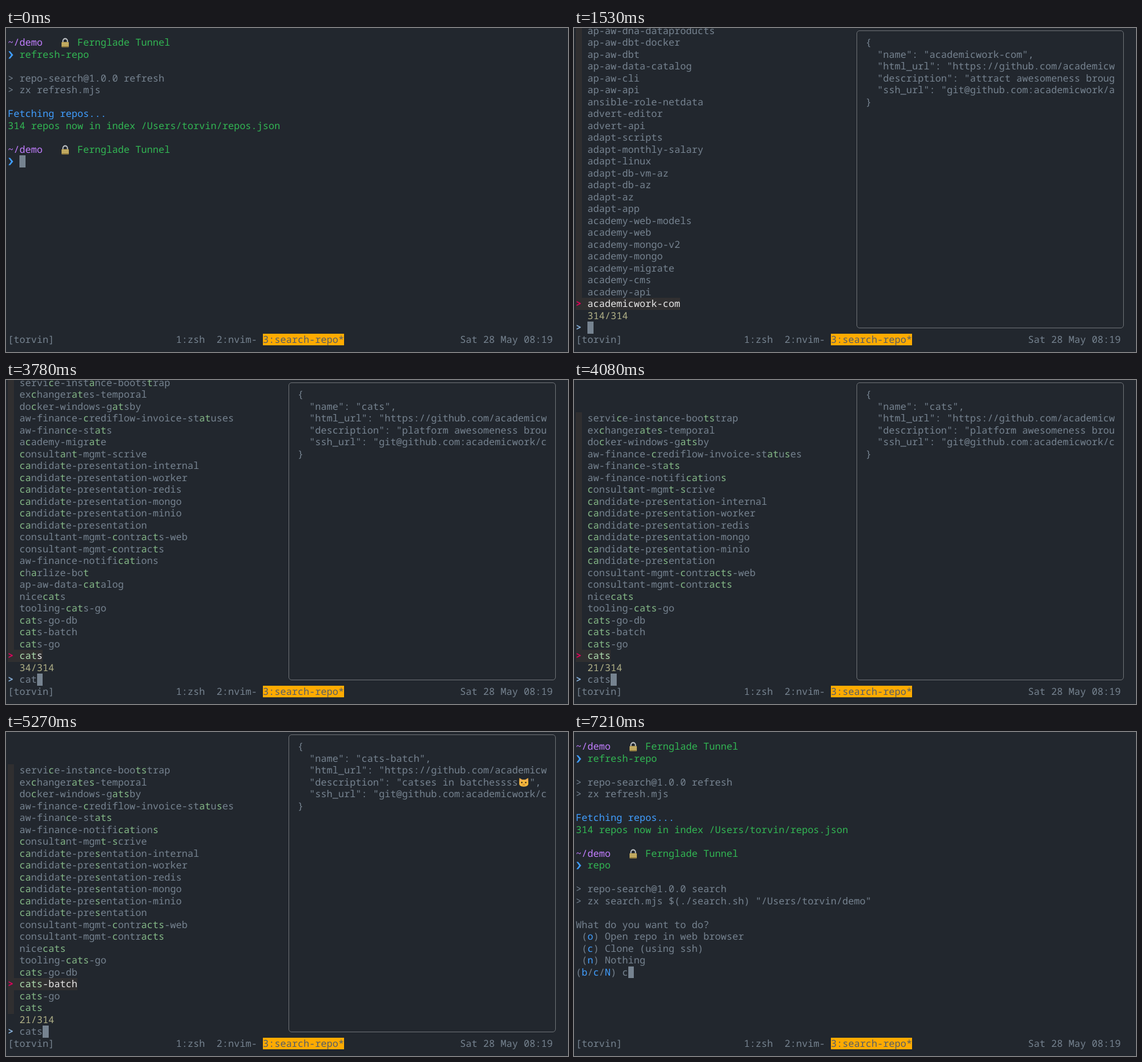
Recreate the animation shown at these times as an HTML page. Size 921 px wide and 532 px high, loop 8000 ms.

```html
<!DOCTYPE html>
<html lang="en">
<head>
<meta charset="utf-8">
<title>Repo search</title>
<style>
html, body { margin: 0; width: 100%; height: 100%; overflow: hidden; background: #22272e; }
body { position: relative; color: #768390; font: 500 15.833px/18px "Noto Sans Mono", "DejaVu Sans Mono", monospace;
  text-rendering: geometricPrecision; font-variant-ligatures: none; }
.screen { position: absolute; inset: 0; visibility: hidden; }
.screen.on { visibility: visible; }
.cell, svg { position: absolute; }
.cell { height: 19.5px; white-space: pre; }
.green { color: #32b653; }
.blue { color: #409eff; }
.purple { color: #c27eff; }
.red { color: #f85149; }
.tab { color: #545d68; background: #ffab00; }
.cursor { width: 9.5px; background: #768390; }
.gutter { width: 9.5px; background: #302f30; }
.current { background: #302f30; color: #e8e8e8; }
.current b { color: #afdcaf; }
.pointer { color: #e0005c; font-weight: 700; }
.info { color: #b0b087; }
.prompt { color: #87afd7; font-weight: 700; }
b { font-weight: inherit; color: #86ba88; }
.preview { position: absolute; left: 463px; top: 4px; width: 436px; height: 487px;
  border: 1px solid #6c7075; border-radius: 5px; }
</style>
</head>
<body>
<script>
const CW = 9.5, RH = 19.5, LOOP = 8000;
const colX = c => 3 + c * CW;
const rowY = r => r * RH - 5.1;

function put(box, row, col, text, cls = "") {
  const el = document.createElement("div");
  el.className = "cell " + cls;
  el.style.left = colX(col) + "px";
  el.style.top = rowY(row) + "px";
  el.textContent = text;
  box.append(el);
  return el;
}

function icon(box, row, col, w, h, shapes) {
  box.insertAdjacentHTML("beforeend",
    `<svg width="${w}" height="${h}" viewBox="0 0 ${w} ${h}" style="left:${colX(col)}px;top:${rowY(row)}px">${shapes}</svg>`);
}

const LOCK = `<path d="M4.3 11V7.2a3.7 3.7 0 0 1 7.4 0V11" fill="none" stroke="#c4c8cb" stroke-width="1.8"/>
  <rect x="2" y="9" width="12" height="8.5" rx="1" fill="#b9a055"/>
  <path d="M2.5 11.5h11M2.5 14h11" stroke="#d0bc78" stroke-width=".8"/>
  <path d="M2.5 16.8h11" stroke="#806a34"/>`;
const ARROW = `<path d="M1 4.3H3.8L8.8 10.3L3.8 16.3H1L5.4 10.3Z" fill="#409eff"/>`;
const CAT = `<path d="M2 10L2.3 2.6L7 5.2H12L16.7 2.6L17 10Q18 16.8 9.5 16.8Q1 16.8 2 10Z" fill="#f6b73c"/>
  <path d="M3.4 4.6L6 6.1L3.6 8ZM15.6 4.6L13 6.1L15.4 8Z" fill="#ee9a86"/>
  <circle cx="6.3" cy="10" r="1.2" fill="#3b2b1d"/><circle cx="12.7" cy="10" r="1.2" fill="#3b2b1d"/>
  <path d="M8.6 12H10.4L9.5 13Z" fill="#b4553f"/>
  <path d="M7.4 13.6Q8.6 14.9 9.5 13.5Q10.4 14.9 11.6 13.6" fill="none" stroke="#8a5a1c" stroke-width=".7"/>`;

function newScreen() {
  const box = document.createElement("div");
  box.className = "screen";
  document.body.append(box);
  return box;
}

const cursor = (box, row, col) => put(box, row, col, "", "cursor");

function promptAt(box, row) {
  put(box, row, 0, "~/demo", "purple");
  icon(box, row, 9, 19, 20, LOCK);
  put(box, row, 12, "Fernglade Tunnel", "green");
  icon(box, row + 1, 0, 10, 20, ARROW);
}

function shell(typed, color = "green", at = [11, 2 + typed.length]) {
  const box = newScreen();
  promptAt(box, 1);
  put(box, 2, 2, "refresh-repo", "green");
  put(box, 4, 0, "> repo-search@1.0.0 refresh");
  put(box, 5, 0, "> zx refresh.mjs");
  put(box, 7, 0, "Fetching repos...", "blue");
  put(box, 8, 0, "314 repos now in index /Users/torvin/repos.json", "green");
  promptAt(box, 10);
  put(box, 11, 2, typed, color);
  cursor(box, ...at);
  return box;
}

function running(...at) {
  const box = shell("repo", "green", at);
  put(box, 13, 0, "> repo-search@1.0.0 search");
  put(box, 14, 0, '> zx search.mjs $(./search.sh) "/Users/torvin/demo"');
  return box;
}

function menu(answer) {
  const box = running(20, 8 + answer.length);
  put(box, 16, 0, "What do you want to do?");
  ["Open repo in web browser", "Clone (using ssh)", "Nothing"].forEach((label, i) => {
    put(box, 17 + i, 1, "( ) " + label);
    put(box, 17 + i, 2, "ocn"[i], "blue");
  });
  put(box, 20, 0, "( / / ) " + answer);
  put(box, 20, 1, "b c N", "blue");
  return box;
}

// Capitals in the lists mark matched letters.
const words = text => text.trim().split(/\s+/);
const matched = name => name.replace(/[A-Z]+/g, m => `<b>${m.toLowerCase()}</b>`);

const ALL = words(`ap-aw-dna-dataproducts ap-aw-dbt-docker ap-aw-dbt ap-aw-data-catalog ap-aw-cli ap-aw-api
  ansible-role-netdata advert-editor advert-api adapt-scripts adapt-monthly-salary adapt-linux adapt-db-vm-az
  adapt-db-az adapt-az adapt-app academy-web-models academy-web academy-mongo-v2 academy-mongo
  academy-migrate academy-cms academy-api academicwork-com`);
const C = words(`Coworker-local Cms-api-legacy Cv-api-legacy awa-Cms-minio nomad-Client Crm-postgres
  Crm-dry-runr Charlize-bot Commissions academy-Cms net-Crypto Crm-adaptr Consul-esm Cats-go-db Cats-batch
  Core-http ap-aw-Cli Configdb oak-Cli Cats-go Consul aw-Com Cats Crm`);
const CAT_LIST = words(`serviCe-instAnce-bootsTrap exChangerATes-temporal doCker-windows-gATsby
  aw-finance-Crediflow-invoice-stATuses aw-finanCe-stATs aCademy-migrATe ConsultAnT-mgmt-scrive
  CAndidaTe-presentation-internal CAndidaTe-presentation-worker CAndidaTe-presentation-redis
  CAndidaTe-presentation-mongo CAndidaTe-presentation-minio CAndidaTe-presentation
  consultant-mgmt-ContrAcTs-web consultant-mgmt-ContrAcTs aw-finance-notifiCATions ChArlize-boT
  ap-aw-data-CATalog niceCATs tooling-CATs-go CATs-go-db CATs-batch CATs-go CATs`);
const CATS = words(`serviCe-instAnce-booTStrap exChangerATeS-temporal doCker-windows-gATSby
  aw-finance-Crediflow-invoice-stATuSes aw-finanCe-stATS aw-finance-notifiCATionS ConsultAnt-mgmT-Scrive
  CAndidaTe-preSentation-internal CAndidaTe-preSentation-worker CAndidaTe-preSentation-redis
  CAndidaTe-preSentation-mongo CAndidaTe-preSentation-minio CAndidaTe-preSentation
  consultant-mgmt-ContrACTS-web consultant-mgmt-ContrACTS niceCATS tooling-CATS-go CATS-go-db CATS-batch
  CATS-go CATS`);

const ABOUT = {
  "academicwork-com": "attract awesomeness brought",
  "cats": "platform awesomeness brought",
  "cats-go": "cats but in go",
  "cats-batch": "catses in batchessss  "
};

function preview(box, name) {
  box.insertAdjacentHTML("beforeend", '<div class="preview"></div>');
  [
    "{",
    `  "name": "${name}",`,
    `  "html_url": "https://github.com/academicwork/${name}",`,
    `  "description": "${ABOUT[name]}",`,
    `  "ssh_url": "git@github.com:academicwork/${name}.git"`,
    "}"
  ].forEach((line, i) => put(box, 1 + i, 50, line.slice(0, 43)));
  if (name === "cats-batch") icon(box, 4, 88, 19, 20, CAT);
}

function finder(query, list, count, shown, up = 0) {
  const box = newScreen(), first = 24 - list.length;
  list.forEach((name, i) => {
    const row = first + i, current = row === 23 - up;
    put(box, row, 0, "", "gutter");
    put(box, row, current ? 0 : 2, "", current ? "current" : "").innerHTML = (current ? "  " : "") + matched(name);
    if (current) put(box, row, 0, ">", "pointer");
  });
  put(box, 24, 2, count + "/314", "info");
  put(box, 25, 0, ">", "prompt");
  put(box, 25, 2, query);
  cursor(box, 25, 2 + query.length);
  preview(box, shown);
  return box;
}

const steps = [
  [0, shell("")],
  [500, shell("r")],
  [650, shell("rep", "red")],
  [790, shell("repo")],
  [1240, shell("repo", "green", [12, 0])],
  [1530, finder("", ALL, 314, "academicwork-com")],
  [3630, finder("c", C, 159, "academicwork-com")],
  [3780, finder("cat", CAT_LIST, 34, "cats")],
  [4080, finder("cats", CATS, 21, "cats")],
  [5130, finder("cats", CATS, 21, "cats-go", 1)],
  [5270, finder("cats", CATS, 21, "cats-batch", 2)],
  [6170, running(16, 0)],
  [6310, menu("")],
  [7210, menu("c")]
];

put(document.body, 26, 0, "[torvin]");
put(document.body, 26, 29, "1:zsh  2:nvim-");
put(document.body, 26, 44, "3:search-repo*", "tab");
put(document.body, 26, 78, "Sat 28 May 08:19");

const start = performance.now();
let shown;
function draw() {
  const t = (performance.now() - start) % LOOP;
  const next = steps.findLast(([at]) => at <= t)[1];
  if (next !== shown) {
    shown?.classList.remove("on");
    next.classList.add("on");
    shown = next;
  }
  requestAnimationFrame(draw);
}
draw();
</script>
</body>
</html>
```
